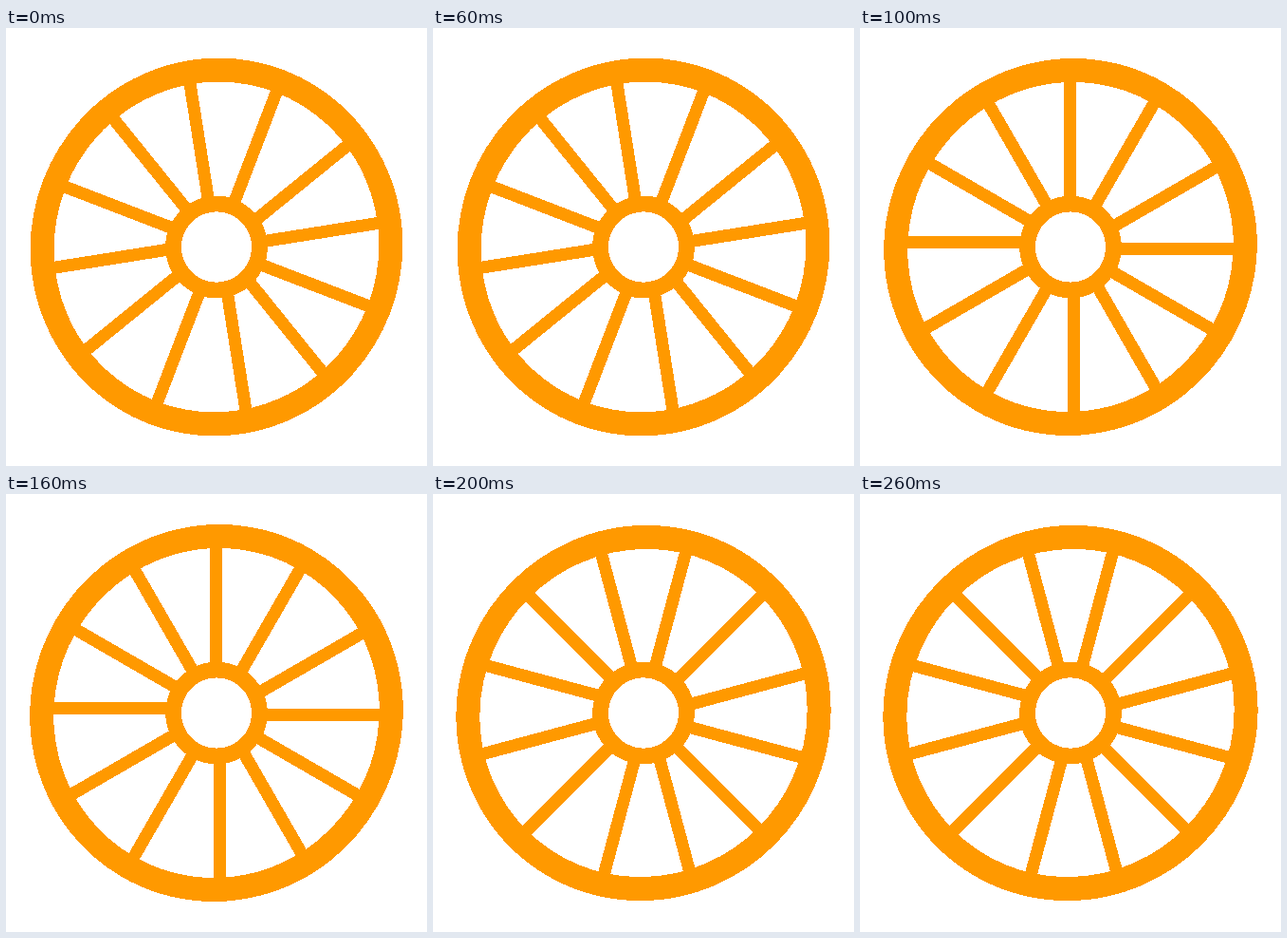
Animation of 444x461 px, one loop 300 ms. Source, as an HTML page:

```html
<!DOCTYPE html>
<html lang="en">
<head>
<meta charset="utf-8">
<title>Turning wheel</title>
<style>
  html, body { margin: 0; width: 100%; height: 100%; overflow: hidden; background: #fff; }
  svg { display: block; width: 444px; height: 461px; }
</style>
</head>
<body>
<svg viewBox="0 0 444 461" fill="none" stroke="#ff9900" shape-rendering="crispEdges">
  <g id="wheel">
    <g id="spokes" stroke-width="13" transform="translate(1.5 -0.8)"></g>
    <ellipse rx="183.4" ry="186.8" stroke-width="25" transform="rotate(30)"/>
    <circle r="45.4" stroke-width="16.7" fill="#fff"/>
  </g>
</svg>
<script>
const SPOKES = 12;
const STEP = 100;
const TURNS = [-9, 0, 15];
const wheel = document.getElementById('wheel');
const spokes = document.getElementById('spokes');

// The spokes are set slightly off centre, in a smooth wobble around the hub.
function sideShift(angle) {
  const a = angle * Math.PI / 180;
  return 0.7 - 3.1 * Math.cos(2 * a + 0.35) - 0.9 * Math.sin(5 * a);
}

for (let i = 0; i < SPOKES; i++) {
  const angle = i * 360 / SPOKES;
  const spoke = document.createElementNS('http://www.w3.org/2000/svg', 'path');
  spoke.setAttribute('d', `M${sideShift(angle)} -46V-180`);
  spoke.setAttribute('transform', `rotate(${angle})`);
  spokes.append(spoke);
}

const start = performance.now();

function render() {
  const time = Math.max(0, performance.now() - start);
  const turn = TURNS[Math.floor(time / STEP) % TURNS.length];
  wheel.setAttribute('transform', `translate(222 230.5) rotate(${turn})`);
  requestAnimationFrame(render);
}
render();
</script>
</body>
</html>
```
